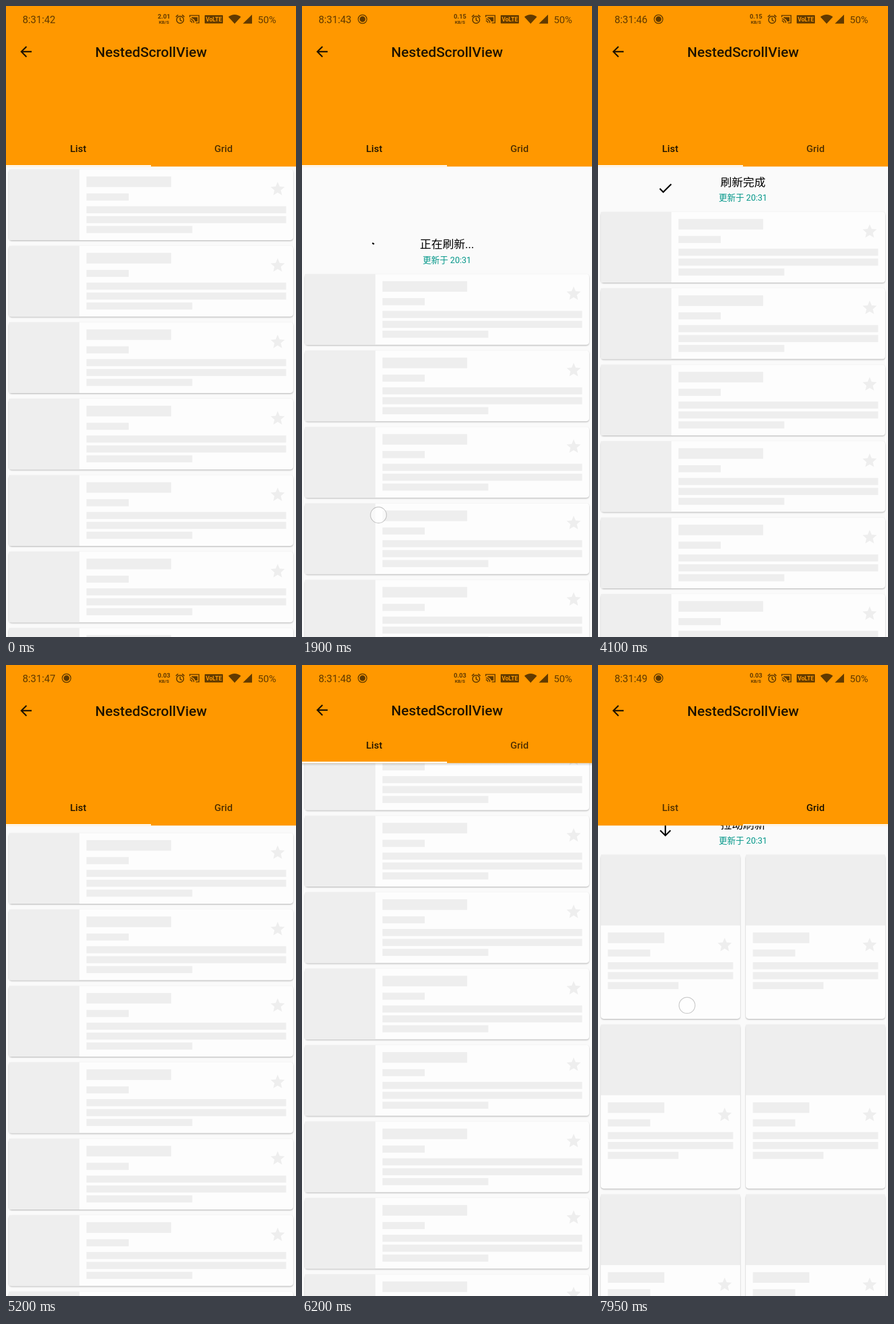
An HTML page that plays this animation: 508 px wide and 1102 px high, repeating every 8 s.

```html
<!DOCTYPE html>
<html lang="en">
<head>
<meta charset="utf-8">
<title>Nested scroll view</title>
<style>
html, body { margin: 0; width: 100%; height: 100%; overflow: hidden; background: #fafafa; }
svg { display: block; width: 100vw; height: 100vh; font-family: Roboto, "Noto Sans CJK SC", "Noto Sans CJK", sans-serif; }
.card { fill: #fdfdfd; filter: drop-shadow(0 1.3px .9px rgba(0,0,0,.28)); }
.mute { fill: #eee; }
.status { fill: rgba(0,0,0,.62); }
.line { fill: none; stroke: rgba(0,0,0,.62); stroke-width: 1.7; }
.ink { fill: rgba(0,0,0,.87); }
.mid { text-anchor: middle; }
.medium { font-weight: 500; }
</style>
</head>
<body>
<svg viewBox="0 0 508 1102" preserveAspectRatio="none">
  <defs>
    <path id="star" d="M12 17.27L18.18 21l-1.64-7.03L22 9.24l-7.19-.61L12 2 9.19 8.63 2 9.24l5.46 4.73L5.82 21z"/>
    <linearGradient id="shade" x2="0" y2="1">
      <stop stop-opacity=".16"/><stop offset="1" stop-opacity="0"/>
    </linearGradient>
  </defs>
  <rect width="508" height="1102" fill="#fafafa"/>
  <g id="list"></g>
  <g id="grid"></g>

  <g id="refresh">
    <text id="message" class="mid" x="254" y="-40" font-size="19.8"></text>
    <text class="mid" x="254" y="-14.5" font-size="14.8" fill="#009688">更新于 20:31</text>
    <g transform="translate(118 -36.5)">
      <path id="arrow" d="M20 12l-1.41-1.41L13 16.17V4h-2v12.17l-5.58-5.59L4 12l8 8 8-8z"/>
      <path id="check" d="M9 16.2L4.8 12l-1.4 1.4L9 19 21 7l-1.4-1.4L9 16.2z" transform="scale(1.236) translate(-12 -12)"/>
      <path id="spinner" fill="none" stroke="#000" stroke-width="2.5"/>
    </g>
  </g>

  <rect id="shadow" width="508" height="5" fill="url(#shade)"/>
  <rect id="bar" width="508" fill="#ff9800"/>
  <g id="tabs">
    <rect id="indicator" y="-2.5" width="254" height="2.5" fill="#fff"/>
    <text id="tabList" class="mid medium" x="126.5" y="-25" font-size="17.3">List</text>
    <text id="tabGrid" class="mid medium" x="381" y="-25" font-size="17.3">Grid</text>
  </g>
  <g id="toolbar">
    <path class="ink" transform="translate(20.2 65) scale(1.236)" d="M20 11H7.83l5.59-5.59L12 4l-8 8 8 8 1.41-1.41L7.83 13H20z"/>
    <text class="ink mid medium" x="254" y="89" font-size="24.7">NestedScrollView</text>
  </g>

  <g class="status">
    <text id="clock" x="29" y="29.5" font-size="17.5"></text>
    <g id="recorder">
      <circle class="line" cx="106" cy="23" r="7.6" style="stroke-width:1.5"/>
      <circle cx="106" cy="23" r="5"/>
    </g>
    <g class="mid" font-weight="700">
      <text id="speed" x="276.7" y="22" font-size="11"></text>
      <text x="276.7" y="30.5" font-size="8">KB/S</text>
    </g>
    <g class="line">
      <circle cx="305" cy="24" r="6.2"/>
      <path d="M305 20v4.5l3 2M297.5 19l4-3.5M312.5 19l-4-3.5"/>
      <path d="M322 19.5V16.5h16v13h-5.5M322 22.5a7 7 0 0 1 7 7M322 25.8a3.7 3.7 0 0 1 3.7 3.7"/>
    </g>
    <path d="M325 19.500h10.500v7.500h-4q-1.500-4.500-6.500-6z"/>
    <rect x="348" y="16" width="32" height="14.5" rx="1"/>
    <text class="mid" x="364" y="26.8" font-size="10" font-weight="700" style="fill:#ff9800">VoLTE</text>
    <path d="M389.5 19Q400.5 11 411.5 19L400.5 31z"/>
    <path d="M431 15v15.7h-16z"/>
    <text x="441" y="29.5" font-size="17.4">50%</text>
  </g>

  <circle id="touch" r="14" fill="#fff" fill-opacity=".6" stroke="#777" stroke-opacity=".4" stroke-width="1.3"/>
</svg>
<script>
const LOOP = 8000, DP = 1.236, OPEN = 280.4, CLOSED = 171.3, REST = 60 * DP;
const BEAT = { grab: 1030, refresh: 1830, settle: 1890, done: 4060, close: 4830,
               scroll: 5320, drop: 5710, tap: 6880, tab: 7040, expand: 7570 };
const $ = id => document.getElementById(id);
const set = (id, attrs) => { for (const k in attrs) $(id).setAttribute(k, attrs[k]); };
const show = (id, on) => set(id, { visibility: on ? "visible" : "hidden" });
const clamp = (v, a = 0, b = 1) => Math.min(b, Math.max(a, v));
const mix = (a, b, p) => a + (b - a) * p;
const part = (t, a, b) => clamp((t - a) / (b - a));
const smooth = p => (1 - Math.cos(Math.PI * p)) / 2;

function bezier(x1, y1, x2, y2) {
  const at = (a, b, u) => 3 * a * u * (1 - u) ** 2 + 3 * b * u * u * (1 - u) + u ** 3;
  return x => {
    let lo = 0, hi = 1;
    for (let i = 0; i < 24; i++) {
      const u = (lo + hi) / 2;
      if (at(x1, x2, u) < x) lo = u; else hi = u;
    }
    return at(y1, y2, lo);
  };
}
const ease = bezier(.25, .1, .25, 1), fastOutSlowIn = bezier(.4, 0, .2, 1);

// Cards, measured in density-independent units
function card(x, y, w, tall) {
  const box = (bx, by, bw, bh) => `<rect class="mute" x="${bx}" y="${by}" width="${bw}" height="${bh}"/>`;
  const left = tall ? 10 : 110, top = tall ? 100 : 0, full = w - 10 - left;
  return `<g transform="translate(${x} ${y}) scale(${DP})">
    <rect class="card" width="${w}" height="${tall ? 232 : 100}" rx="4"/>
    ${box(0, 0, tall ? w : 100, 100)}
    ${box(left, top + 10, tall ? 80 : 120, 15)}${box(left, top + 34, 60, 10)}
    ${box(left, top + 52, full, 10)}${box(left, top + 66, full, 10)}
    ${box(left, top + 80, tall ? 100 : 150, 10)}
    <use href="#star" class="mute" x="${w - 34}" y="${top + 15.5}"/></g>`;
}
const M = 4 * DP, fit = px => (px - 2 * M) / DP;
for (let i = 0; i < 9; i++) $("list").innerHTML += card(M, M + i * 108 * DP, fit(508));
for (let i = 0; i < 8; i++)
  $("grid").innerHTML += card(M + (i % 2) * 254, M + (i >> 1) * 240 * DP, fit(254), true);

// Rubber-band distance for a finger travel past the edge
const pull = d => 822 * (1 - 1 / (1 + d * .52 / 822));
function spring(ms, w) {
  const k = Math.max(0, ms) / 1000 * w;
  return (1 + k) * Math.exp(-k);
}
const travel = {
  grab: t => 456 * smooth(part(t, BEAT.grab, 1850)),
  scroll: t => -149 * smooth(part(t, BEAT.scroll, BEAT.drop)),
  expand: t => 202 * smooth(part(t, BEAT.expand, 8050)) / smooth(part(7950, BEAT.expand, 8050))
};

function listShift(t) {
  if (t < BEAT.settle) return pull(travel.grab(t));
  if (t < BEAT.close) return mix(REST, pull(456), spring(t - BEAT.settle, 14));
  if (t < BEAT.scroll) return REST * spring(t - BEAT.close, 10.2);
  if (t < BEAT.drop) return travel.scroll(t);
  return -149 - 7 * (1 - Math.exp((BEAT.drop - t) / 180));
}
function gridShift(t) {
  const y = CLOSED - OPEN + travel.expand(t);
  return y > 0 ? pull(y) : y;
}

// Touches fade out shortly after release
const touches = [
  { from: BEAT.grab, to: 1900, at: t => [mix(150, 134, part(t, BEAT.grab, 1850)), 433 + travel.grab(t)] },
  { from: BEAT.scroll, to: BEAT.drop, at: t => [mix(62, 49, part(t, BEAT.scroll, BEAT.drop)), 469 + travel.scroll(t)] },
  { from: BEAT.tap, to: BEAT.tab, at: () => [369, 142] },
  { from: BEAT.expand, to: LOOP, at: t => [mix(148, 156, part(t, BEAT.expand, 7950)), 392 + travel.expand(t)] }
];
const FADE = 55;

function arc(ms) {
  const turn = ms / 1000, step = Math.floor(turn) % 5, u = turn % 1, r = 13.6;
  const head = fastOutSlowIn(clamp(u * 2)), tail = fastOutSlowIn(clamp(u * 2 - 1));
  const a = Math.PI * (-.5 + tail * 1.5 + u * 1.7 - step * .8);
  const sweep = Math.max((head - tail) * 1.5 * Math.PI, .001);
  const point = q => `${r * Math.cos(q)} ${r * Math.sin(q)}`;
  return `M${point(a)}A${r} ${r} 0 ${sweep > Math.PI ? 1 : 0} 1 ${point(a + sweep)}`;
}

function draw(t) {
  const slide = ease(part(t, BEAT.tab, BEAT.tab + 300));
  const shift = t < BEAT.tab ? listShift(t) : gridShift(t);
  const edge = clamp(OPEN + shift, CLOSED, OPEN);
  const folded = part(OPEN - edge, 0, OPEN - CLOSED);
  set("list", { transform: `translate(${-508 * slide} ${OPEN + listShift(t)})` });
  set("grid", { transform: `translate(${508 * (1 - slide)} ${OPEN + gridShift(t)})` });
  show("list", slide < 1);
  show("grid", slide > 0);

  const busy = t >= BEAT.refresh && t < BEAT.done;
  const done = t >= BEAT.done && t < BEAT.scroll;
  const over = shift > REST;
  $("refresh").style.display = shift > 0 ? "" : "none";
  set("refresh", { transform: `translate(0 ${OPEN + shift})` });
  $("message").textContent = busy ? "正在刷新..." : done ? "刷新完成" : over ? "释放刷新" : "拉动刷新";
  show("arrow", !busy && !done);
  show("check", done);
  show("spinner", busy);
  const flip = 180 * clamp((shift - REST) / 25);
  set("arrow", { transform: `rotate(${flip}) scale(${DP}) translate(-12 -12)` });
  if (busy) set("spinner", { d: arc(t - BEAT.refresh) });

  set("bar", { height: edge });
  set("shadow", { y: edge, opacity: part(folded, .9, 1) });
  set("tabs", { transform: `translate(0 ${edge})` });
  set("toolbar", { transform: `translate(0 ${-folded})` });
  set("indicator", { x: 254 * slide });
  set("tabList", { "fill-opacity": mix(.87, .68, slide) });
  set("tabGrid", { "fill-opacity": mix(.68, .87, slide) });

  $("clock").textContent = "8:31:" + (42 + Math.floor(t / 1000));
  $("speed").textContent = t < 1050 ? "2.01" : t < 4550 ? "0.15" : "0.03";
  show("recorder", t >= 50);

  const touch = touches.find(c => t >= c.from && t < c.to + FADE);
  show("touch", touch);
  if (touch) {
    const [cx, cy] = touch.at(t);
    set("touch", { cx, cy, opacity: 1 - part(t, touch.to, touch.to + FADE) });
  }
}

const start = performance.now();
function tick() {
  draw((performance.now() - start) % LOOP);
  requestAnimationFrame(tick);
}
tick();
</script>
</body>
</html>
```
